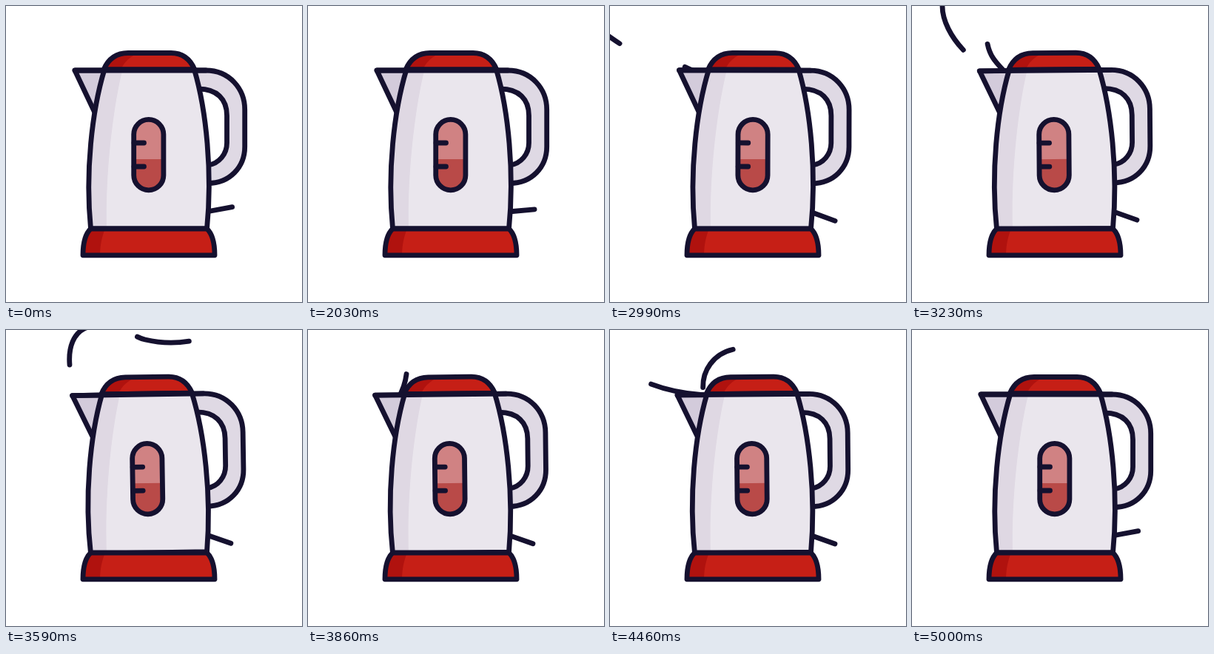
Animation of 400 by 400 pixels, one loop 5660 ms. Source, as an HTML page:

```html
<!DOCTYPE html>
<html lang="en">
<head>
<meta charset="utf-8">
<title>Kettle</title>
<style>
  html, body { margin: 0; width: 100%; height: 100%; overflow: hidden; background: #fff; }
  svg { display: block; width: 100vw; height: 100vh; }
  .line { fill: none; stroke: #15112f; stroke-width: 6.8; stroke-linecap: round; stroke-linejoin: round; }
</style>
</head>
<body>
<svg viewBox="0 0 400 400">
  <defs>
    <path id="body" d="M133 86C116 142 107 225 114.5 301H271.5C279 225 271 142 254.5 86Z"/>
    <path id="lid" d="M132 86C138 72 149 63.5 165 63.5H223C239 63.5 249 72 255 86Z"/>
    <path id="base" d="M104 336.8C104 320 108 307 114.5 301H271.5C278 307 282 320 282 336.8Z"/>
    <path id="spout" d="M93 87H136L119.5 143Z"/>
    <path id="grip" d="M254 87H270C302 87 322.7 112 322.7 140V190C322.7 218 302 239.5 273 239.5V215C288 213 298.5 200 298.5 185V148C298.5 126 285 112 260 112Z"/>
    <rect id="glass" x="172.7" y="153.4" width="40.2" height="95.4" rx="20.1"/>
    <clipPath id="inBody"><use href="#body"/></clipPath>
    <clipPath id="inLid"><use href="#lid"/></clipPath>
    <clipPath id="inBase"><use href="#base"/></clipPath>
    <clipPath id="inGlass"><use href="#glass"/></clipPath>
  </defs>
  <g id="steam"></g>
  <g id="kettle">
    <path id="lever" class="line" d="M271 278H306.2"/>
    <use href="#grip" fill="#dfd9e4"/>
    <use href="#grip" class="line"/>
    <use href="#spout" fill="#d3cbdb"/>
    <use href="#spout" class="line"/>
    <use href="#lid" fill="#c61f16"/>
    <path d="M125 60H188C170 66 158 75 154 90H125Z" fill="#b0120e" clip-path="url(#inLid)"/>
    <use href="#lid" class="line"/>
    <use href="#body" fill="#eae6ed"/>
    <path d="M100 80H159C147 125 134 215 136 305H100Z" fill="#dfd8e3" clip-path="url(#inBody)"/>
    <use href="#body" class="line"/>
    <path class="line" d="M93 87H270"/>
    <use href="#glass" fill="#d08283"/>
    <path d="M165 207H220V255H165Z" fill="#b94a48" clip-path="url(#inGlass)"/>
    <use href="#glass" class="line"/>
    <path class="line" d="M173 185H186.5M173 217H186.5"/>
  </g>
  <use href="#base" fill="#c61f16"/>
  <path d="M95 295H137C130 308 127 322 127 340H95Z" fill="#b0120e" clip-path="url(#inBase)"/>
  <use href="#base" class="line"/>
</svg>
<script>
const LOOP = 5660, START = 2030, STEP = 30;
const PUFF = 71;
const SHAKE = { from: 2570, to: 5000, period: 127, angle: 0.9, trough: 3590 };
const drift = "M132 88C110 87 78 83 48 70S-10 35-50 5";

// start time, speed in px per ms, route
const puffs = [
  [2561, 0.46, drift],
  [2934, 0.46, "M125 92C105 85 85 76 69 59S41 20 41 0S41-40 45-90"],
  [3144, 0.57, "M128 92C118 80 106 72 102 51C98 30 100-10 130-15C150-18 165 8 188 13C211 18.5 235 18.5 258 13C290 5 310-20 330-60"],
  [3318, 0.46, "M112 92C95 80 86 65 86 47C84 22 92 5 106-2C125-10 150-15 180-40"],
  [3785, 0.46, "M122 92C132 75 137 52 131 33C124 18 108 5 92 0C70-8 50-30 40-70"],
  [4290, 0.46, drift],
  [4310, 0.57, "M128 92C118 60 140 20 190 25S260 48 310 30S362 15 367-12"]
].map(([start, speed, d]) => {
  const path = document.createElementNS("http://www.w3.org/2000/svg", "path");
  path.setAttribute("d", d);
  path.setAttribute("class", "line");
  path.setAttribute("stroke-dasharray", `${PUFF} 3000`);
  document.getElementById("steam").append(path);
  return { start, speed, path, length: path.getTotalLength() };
});

const kettle = document.getElementById("kettle");
const lever = document.getElementById("lever");
const clamp = x => Math.min(1, Math.max(0, x));
const easeOut = x => 1 - (1 - x) ** 2;
const press = (t, from) => easeOut(clamp((t - from + STEP) / 330));

function draw(t) {
  for (const { start, speed, path, length } of puffs) {
    const head = (t - start) * speed;
    path.style.display = head > 0 && head < length + PUFF ? "" : "none";
    path.setAttribute("stroke-dashoffset", PUFF - head);
  }
  const shaking = t >= SHAKE.from && t < SHAKE.to;
  const phase = 2 * Math.PI * (t - SHAKE.trough) / SHAKE.period;
  const tilt = shaking ? -SHAKE.angle * Math.cos(phase) : 0;
  kettle.setAttribute("transform", `rotate(${tilt} 192 301)`);
  const turn = -10.5 + 30.5 * (press(t, START) - press(t, 4700));
  lever.setAttribute("transform", `rotate(${turn} 271 278)`);
}

const origin = performance.now();
function tick() {
  const t = (performance.now() - origin) % LOOP;
  draw(t < START ? 0 : START + STEP * Math.floor((t - START) / STEP));
  requestAnimationFrame(tick);
}
tick();
</script>
</body>
</html>
```
